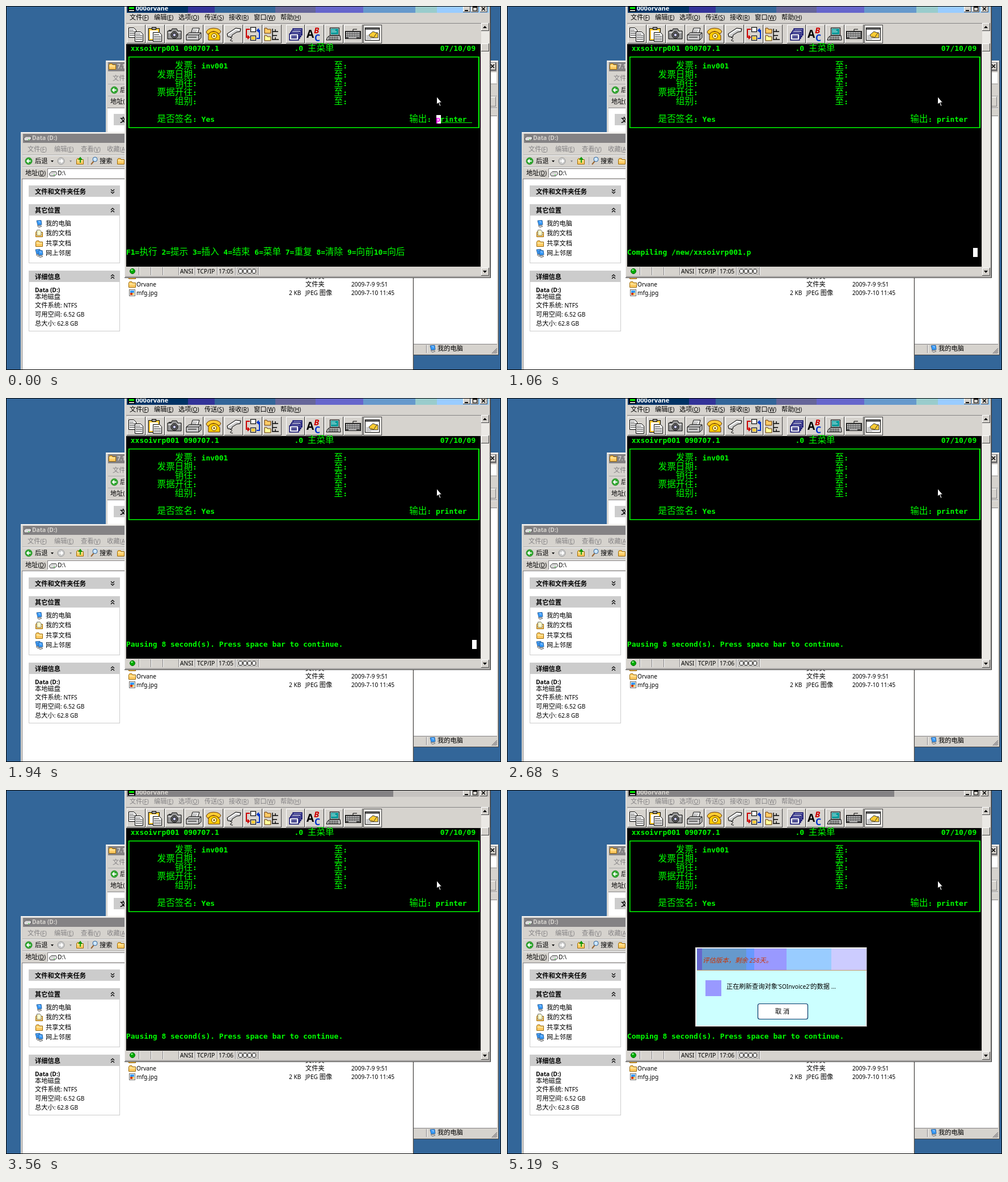
An HTML page with a canvas that plays this animation: 873 by 641 pixels, repeating every 8000 ms.

```html
<!DOCTYPE html>
<html lang="zh">
<head>
<meta charset="utf-8">
<title>Terminal</title>
<style>
html, body { margin: 0; width: 100%; height: 100%; overflow: hidden; background: #336699; }
canvas { display: block; }
</style>
</head>
<body>
<canvas id="stage" width="873" height="641"></canvas>
<script>
const g = document.getElementById('stage').getContext('2d');
const LOOP = 8000;
const FACE = '#d6d3ce', SHADE = '#848284', GREEN = '#00ff00';
const HAN = "'Noto Sans CJK SC', 'Noto Sans CJK', sans-serif";
const ui = (style = '', latin = 10.2, han = 11.25) =>
  [`${style} ${latin}px 'Noto Sans', sans-serif`, `${style} ${han}px ${HAN}`];
const UI = ui(), BOLD = ui('bold'), TITLE = ui('bold', 11), SLANT = ui('italic', 10.6, 11.4);
const TERM = ["bold 13px 'DejaVu Sans Mono', monospace", `15.6px ${HAN}`];
const CELL = 7.8, ROW = 15.6;

function box(x, y, w, h, c) {
  g.fillStyle = c;
  g.fillRect(x, y, w, h);
}

function frame(x, y, w, h, c) {
  g.strokeStyle = c;
  g.lineWidth = 1;
  g.strokeRect(x + .5, y + .5, w - 1, h - 1);
}

function path(d, fill, stroke, width = 1) {
  const p = new Path2D(d);
  if (fill) { g.fillStyle = fill; g.fill(p); }
  if (stroke) { g.strokeStyle = stroke; g.lineWidth = width; g.stroke(p); }
}

function disc(x, y, r, fill, stroke) {
  g.beginPath();
  g.arc(x, y, r, 0, 7);
  g.fillStyle = fill;
  g.fill();
  if (stroke) { g.strokeStyle = stroke; g.lineWidth = 1; g.stroke(); }
}

// Raised edge; swap the colours for a sunken one
function bevel(x, y, w, h, fill = FACE, light = '#fff', dark = SHADE) {
  box(x, y, w, h, fill);
  box(x, y, w, 1, light);
  box(x, y, 1, h, light);
  box(x, y + h - 1, w, 1, dark);
  box(x + w - 1, y, 1, h, dark);
}

// Draws Latin and Han runs in their own fonts, returns the end position
function text(s, x, y, c = '#000', fonts = UI) {
  g.fillStyle = c;
  for (const run of s.match(/[\u2e80-\uffef]+|[^\u2e80-\uffef]+/g)) {
    g.font = fonts[run.charCodeAt(0) >= 0x2e80 ? 1 : 0];
    g.fillText(run, x, y);
    x += g.measureText(run).width;
  }
  return x;
}

function menu(label, key, x, y, c) {
  const a = text(label + '(', x, y, c);
  const b = text(key, a, y, c);
  box(a, y + 1, b - a, 1, c);
  text(')', b, y, c);
}

function term(s, col, row, c = GREEN) {
  let x = 212 + col * CELL;
  for (const ch of s) {
    const wide = ch.charCodeAt(0) >= 0x2e80;
    text(ch, x, 79 + row * ROW, c, TERM);
    x += wide ? CELL * 2 : CELL;
  }
}

function at(x, y, draw) {
  g.save();
  g.translate(x, y);
  draw();
  g.restore();
}

const folder = (x, y) => at(x, y, () => {
  path('M.5 2.5L2 .5H6L7 2.5H12.5V10.5H.5Z', '#ffcc66', '#996600');
  box(1, 4, 11, 1, '#ffffcc');
});
const drive = (x, y) => at(x, y, () => {
  path('M.5 5L4 1.5H12L13.5 4V6L10 9.5H2L.5 7Z', '#ccc', '#555');
  path('M2 6L10 6L13 4', null, '#fff');
  box(8, 7, 2, 1, '#00cc00');
});
const pc = (x, y) => at(x, y, () => {
  path('M2 1L10 .5L11 8L4 9Z', '#3399ff', '#336699');
  path('M4 2.5L8 2L9 5Z', '#99ccff');
  path('M3 10L8 9L11 11L6 13Z', '#ccc', '#777');
});
const back = (x, y, on = true) => {
  disc(x, y, 6, on ? '#33aa33' : '#ccc', on ? '#228822' : '#999');
  at(x, y, () => {
    if (!on) g.scale(-1, 1);
    path('M3.5 0H-3M0 -3L-3 0L0 3', null, '#fff', 1.8);
  });
};
const drop = (x, y) => path(`M${x} ${y}h5l-2.5 3z`, '#000');

function chevrons(x, y, dir) {
  for (const dy of [-3, 1])
    path(`M${x - 3} ${y + dy + (dir > 0 ? 0 : 3)}l3 ${3 * dir}l3 ${-3 * dir}`, null, '#000', 1.2);
}

function panel(title, y, bottom, dir) {
  if (bottom) frame(40, y, 161, bottom - y, '#ccc');
  box(40, y, 161, 20, '#ccc');
  text(title, 51, y + 15, '#000', BOLD);
  chevrons(188, y + 10, dir);
}

function rearWindow() {
  bevel(176, 96, 693, 519, FACE, '#e8e6e2', '#444');
  box(177, 97, 691, 1, '#fff');
  box(180, 99, 685, 16, SHADE);
  folder(181, 101);
  text('7.1', 196, 110, FACE, BOLD);
  bevel(851, 100, 13, 13, FACE, '#fff', '#444');
  path('M855 103l6 6m0 -6l-6 6', null, '#000', 1.6);
  text('文件', 188, 131, SHADE);
  box(180, 137, 686, 1, '#aaa');
  box(845, 117, 20, 19, '#fff');
  back(191, 148);
  text('后退', 201, 152);
  box(180, 158, 686, 1, '#aaa');
  text('地址(D)', 184, 172);
  bevel(848, 160, 16, 17);
  box(179, 179, 687, 416, '#fff');
  box(179, 179, 687, 1, SHADE);
  box(855, 181, 11, 12, FACE);
  box(855, 193, 11, 1, SHADE);
  box(190, 190, 30, 20, '#ccc');
  text('文', 201, 205, '#000', BOLD);
  box(179, 595, 687, 18, FACE);
  box(719, 595, 147, 1, SHADE);
  box(741, 597, 1, 14, SHADE);
  box(742, 597, 1, 14, '#fff');
  pc(746, 597);
  text('我的电脑', 761, 607);
  for (const d of [3, 6, 9]) path(`M${866 - d} 612L866 ${612 - d}`, null, SHADE, 1.3);
}

function fileWindow() {
  bevel(26, 222, 693, 430, FACE, '#e8e6e2', '#444');
  box(27, 223, 691, 1, '#fff');
  box(30, 225, 685, 16, SHADE);
  drive(31, 228);
  text('Data (D:)', 46, 236, FACE, BOLD);
  [['文件', 'F', 38], ['编辑', 'E', 85], ['查看', 'V', 132], ['收藏', 'A', 178]]
    .forEach(([s, k, x]) => menu(s, k, x, 256, SHADE));
  box(29, 262, 685, 1, '#aaa');
  box(29, 263, 685, 1, '#fff');
  back(40, 273);
  text('后退', 51, 277);
  drop(79, 272);
  back(97, 273, false);
  path('M112 272h4l-2 3z', SHADE);
  folder(124, 268);
  path('M131 276v-8m-3 3l3 -4l3 4', null, '#009900', 1.8);
  box(144, 266, 1, 14, '#aaa');
  path('M150 279L155 273', null, '#996633', 2);
  disc(157, 270, 4, '#cce6ff', '#336699');
  text('搜索', 165, 277);
  folder(196, 268);
  box(29, 283, 685, 1, '#aaa');
  box(29, 284, 685, 1, '#fff');
  menu('地址', 'D', 34, 298, '#000');
  bevel(73, 286, 640, 17, '#fff', SHADE, '#fff');
  drive(76, 290);
  text('D:\\', 91, 298);
  box(29, 304, 688, 336, '#fff');
  box(29, 304, 688, 1, SHADE);
  box(28, 304, 1, 336, SHADE);

  panel('文件和文件夹任务', 316, 0, 1);
  panel('其它位置', 349, 453, -1);
  panel('详细信息', 466, 573, -1);
  pc(52, 377);
  folder(52, 396);
  path('M54.5 394.5H60L62 397V404H54.5Z', '#ffffcc', '#777');
  folder(52, 413);
  pc(50, 428);
  pc(54, 430);
  ['我的电脑', '我的文档', '共享文档', '网上邻居']
    .forEach((s, i) => text(s, 70, 387 + i * 17.4));
  text('Data (D:)', 51, 504, '#000', BOLD);
  ['本地磁盘', '文件系统: NTFS', '可用空间: 6.52 GB', '总大小: 62.8 GB']
    .forEach((s, i) => text(s, 51, 515.5 + i * 15.7));

  folder(216, 470);
  text('文件夹', 528, 479.5);
  folder(216, 485);
  text('Orvane', 230, 494);
  text('文件夹', 528, 494);
  text('2009-7-9 9:51', 609, 494);
  box(217, 499, 11, 12, '#fff');
  frame(217, 499, 11, 12, '#666');
  box(219, 501, 7, 4, '#3399ff');
  box(219, 505, 4, 4, '#cc3300');
  box(223, 505, 3, 4, '#ffcc66');
  text('mfg.jpg', 230, 508.5);
  text('2 KB', 499, 508.5);
  text('JPEG 图像', 528, 508.5);
  text('2009-7-10 11:45', 609, 508.5);
}

function page(x, y, w, h) {
  path(`M${x}.5 ${y}.5h${w - 4}l4 4v${h - 4}h${-w}z`, '#fff', '#000');
  for (let i = 4; i < h - 1; i += 3) box(x + 2, y + i, i < 6 ? w - 6 : w - 3, 1, '#333');
}

function keys(x, y, cols, rows, c) {
  for (let r = 0; r < rows; r++)
    for (let i = 0; i < cols; i++) box(x + i * 3, y + r * 3, 2, 2, c);
}

const screen = (x, y, w, h, c) => {
  box(x, y, w, h, '#ccc');
  frame(x, y, w, h, '#000');
  box(x + 2, y + 2, w - 4, h - 4, c);
};

const ICONS = [
  () => { page(0, 1, 13, 17); page(11, 8, 14, 17); },
  () => {
    box(1, 2, 20, 22, '#ffcc33'); frame(1, 2, 20, 22, '#000');
    box(7, 0, 8, 5, '#999'); frame(7, 0, 8, 5, '#000');
    box(4, 6, 14, 15, '#fff'); page(9, 9, 15, 16);
  },
  () => {
    path('M1 7H7L9 3H17L19 7H25V21H1Z', '#999', '#000');
    box(2, 8, 22, 3, '#ccc');
    disc(13, 14, 6, '#666', '#000'); disc(13, 14, 3, '#ccf', '#000');
    box(3, 5, 4, 2, '#333');
  },
  () => {
    path('M8 12L11 2H23L20 12Z', '#fff', '#000');
    path('M0 14L5 10H26V19L22 23H0Z', '#ccc', '#000');
    path('M0 14H22L26 10M22 14V23', null, '#000');
    box(3, 17, 15, 2, '#666'); box(11, 5, 8, 1, '#666'); box(10, 8, 8, 1, '#666');
  },
  () => {
    path('M4 13L9 8H18L24 15V23H4Z', '#ffcc00', '#663300');
    path('M0 9Q3 2 13 2T26 8L23 12L18 9Q13 6 8 9L3 13Z', '#ffcc33', '#663300');
    disc(14, 16, 4.5, '#fff3a0', '#663300'); disc(14, 16, 1.5, '#663300');
  },
  () => {
    path('M2 12L17 2L26 3L25 8L19 9L11 14L10 18L3 17Z', '#ccc', '#000');
    path('M4 13L18 4L24 5', null, '#fff', 2);
    path('M7 18Q13 20 9 22T12 25', null, '#000');
  },
  () => {
    screen(9, 0, 10, 9, '#fff'); screen(9, 15, 10, 9, '#ffcc33');
    path('M8 4H2V18H7M4 15L7 18L4 21', null, '#cc0000', 2);
    path('M20 20H25V6H21M24 3L21 6L24 9', null, '#0033cc', 2);
  },
  () => {
    path('M0 2H4L5 4H11V11H0Z', '#ffcc66', '#663300');
    path('M0 15H4L5 17H11V24H0Z', '#ffff99', '#663300');
    path('M14 3V23M14 8H24M14 15H22M14 22H25M19 4V8M19 18V22', null, '#000', 1.4);
  },
  () => {
    for (let i = 0; i < 4; i++)
      path(`M${9 - i * 2} ${3 + i * 3}H${25 - i * 2}V${14 + i * 3}H${9 - i * 2}Z`, i % 2 ? '#fff' : '#9999cc', '#000066', 1.4);
    path('M6 16H16M6 19H16', null, '#000066', 2);
  },
  () => {
    text('A', -1, 19, '#000', ui('bold', 19));
    text('B', 12, 11, '#cc0000', ui('bold italic', 15));
    text('C', 13, 25, '#0033cc', ui('bold', 16));
  },
  () => {
    screen(6, 1, 17, 14, '#009999');
    box(9, 5, 7, 1, '#fff'); box(9, 8, 9, 1, '#fff');
    path('M2 18L6 15H24L25 23H0Z', '#ccc', '#000');
    keys(4, 17, 6, 2, '#333');
  },
  () => {
    box(-1, 7, 28, 14, '#555'); frame(-1, 7, 28, 14, '#000');
    keys(1, 9, 8, 3, '#ccc'); box(5, 18, 14, 2, '#ccc');
    path('M13 7V4H20', null, '#000');
  },
  () => {
    box(0, 1, 26, 23, '#fff'); frame(0, 1, 26, 23, '#000');
    box(1, 2, 24, 3, '#666'); box(2, 14, 9, 8, '#ccc');
    path('M7 14L14 8L23 11V19H11Z', '#ffcc33', '#333');
    path('M11 16L15 19L22 9', null, '#333');
  }
];

function toolbar() {
  ICONS.forEach((icon, i) => {
    const x = 213 + i * 34.2 + (i > 3 ? 1 : 0) + (i > 7 ? 6.5 : 0) | 0;
    bevel(x, 33, 33, 33, i === 12 ? '#e8e6e2' : FACE, i === 12 ? '#444' : '#fff', '#444');
    at(x + 3, 37, icon);
  });
}

function titleBar(active) {
  const bands = active
    ? [[213, '#003366'], [321, '#333399'], [368, '#336699'], [475, '#666699'], [546, '#6666cc'],
       [630, '#6699cc'], [722, '#99cccc'], [760, '#99ccff']]
    : [[213, SHADE], [683, '#c6c3c0']];
  bands.forEach(([x, c]) => box(x, 1, 852 - x, 11, c));
  box(215, 0, 13, 10, '#000');
  box(217, 2, 9, 3, GREEN);
  box(217, 7, 9, 2, '#ccc');
  text('000orvane', 229, 8, active ? '#fff' : FACE, TITLE);
  for (const x of [806, 820, 836]) bevel(x, 0, 13, 11, FACE, '#fff', '#444');
  box(809, 7, 6, 2, '#000');
  frame(823, 1, 8, 8, '#000');
  box(823, 1, 8, 2, '#000');
  path('M839 2l6 6m0 -6l-6 6', null, '#000', 1.6);
}

function terminal(t) {
  const field = t < 1060, active = t < 3560;
  const blink = field ? t < 100 || t >= 630
    : active && !(t >= 1380 && t < 1940) && !(t >= 2680 && t < 3000);

  bevel(209, -2, 646, 481, FACE, '#eee', '#333');
  box(853, 0, 1, 477, SHADE);
  box(210, 476, 644, 1, SHADE);
  titleBar(active);

  const items = [['文件', 'F', 218], ['编辑', 'E', 261], ['选项', 'O', 304], ['传送', 'S', 350],
    ['接收', 'R', 393], ['窗口', 'W', 437], ['帮助', 'H', 484]];
  items.slice(0, t >= 3000 && active ? 5 : 7)
    .forEach(([s, k, x]) => menu(s, k, x, 24, t < 3000 ? '#000' : SHADE));
  box(212, 30, 626, 1, SHADE);
  toolbar();

  box(838, 30, 14, 445, '#ebe9e5');
  for (const y of [30, 66, 461]) bevel(838, y, 14, 14, FACE, '#fff', '#444');
  path('M841 39h7l-3.5 -4z', '#000');
  path('M841 466h7l-3.5 4z', '#000');

  box(212, 67, 625, 392, '#000');
  term('xxsoivrp001 090707.1', 1, 0);
  term('.0 主菜单', 38, 0);
  term('07/10/09', 71, 0);
  box(216, 89, 619, 1.5, GREEN);
  box(216, 213.5, 619, 1.5, GREEN);
  box(216, 89, 1.5, 126, GREEN);
  box(833, 89, 2, 126, GREEN);
  ['发票: inv001', '发票日期:', '销往:', '票据开往:', '组别:'].forEach((s, i) => {
    term(s, i % 2 ? 7 : 11, i + 2);
    term('至:', 47, i + 2);
  });
  term('是否签名: Yes', 7, 8);
  term('输出: printer', 64, 8);
  if (field) {
    box(759, 205, 63, 1, GREEN);
    if (blink) {
      box(759, 192, 8, 15, '#fff');
      term('p', 70, 8, '#ff00ff');
    }
  } else if (blink) box(822, 426, 8, 16, '#fff');

  const pause = ' 8 second(s). Press space bar to continue.';
  term(field ? 'F1=执行 2=提示 3=插入 4=结束 6=菜单 7=重复 8=清除 9=向前10=向后'
    : t < 1170 ? 'Compiling /new/xxsoivrp001.p'
    : (t < 5190 ? 'Pausing' : 'Comping') + pause, 0, 23);

  for (const x of [234, 255, 276, 304, 333, 372, 404, 445]) {
    box(x, 460, 1, 14, SHADE);
    box(x + 1, 460, 1, 14, '#fff');
  }
  disc(223, 467, 4.5, '#00aa00', '#006600');
  disc(222, 465, 1.5, '#99ff99');
  text('ANSI', 307, 471);
  text('TCP/IP', 337, 471);
  text(t < 2480 ? '17:05' : '17:06', 375, 471);
  frame(407, 461, 37, 12, '#aaa');
  for (let i = 0; i < 4; i++) path(`M${411.5 + i * 8} 463.5h4l1 1v5l-1 1h-4l-1 -1v-5z`, '#fff', '#000');
}

function dialog() {
  bevel(332, 277, 303, 140, '#ccffff', '#ccc', '#666');
  frame(333, 278, 301, 138, '#fff');
  [[335, '#6666cc'], [344, '#6699cc'], [422, '#6699ff'], [436, '#9999ff'], [493, '#99ccff'], [572, '#ccccff']]
    .forEach(([x, c]) => box(x, 279, 634 - x, 38, c));
  box(335, 317, 299, 1, '#cc9966');
  text('评估版本，剩余 258天。', 345, 304, '#cc3300', SLANT);
  box(350, 335, 28, 28, '#9999ff');
  text("正在刷新查询对象'SOInvoice2'的数据 ...", 387, 350);
  g.beginPath();
  g.roundRect(442.5, 376.5, 88, 27, 3);
  g.fillStyle = '#fff';
  g.fill();
  g.strokeStyle = '#003366';
  g.lineWidth = 1.2;
  g.stroke();
  text('取 消', 473, 394);
}

function draw(t) {
  box(0, 0, 873, 641, '#336699');
  rearWindow();
  fileWindow();
  terminal(t);
  if (t >= 3660) dialog();
  path('M759.5 159.5V173.5L762.5 170.5L765 176.5L767 175.5L764.5 170H768.5Z', '#fff', '#000');
  frame(0, 0, 873, 641, '#000');
}

const CUTS = [100, 630, 1060, 1170, 1380, 1940, 2480, 2680, 3000, 3560, 3660, 5190];
const start = performance.now();
let shown = -1;

function tick() {
  const t = (performance.now() - start) % LOOP;
  const step = CUTS.filter(c => c <= t).length;
  if (step !== shown) {
    draw(t);
    shown = step;
  }
  requestAnimationFrame(tick);
}
tick();
</script>
</body>
</html>
```
